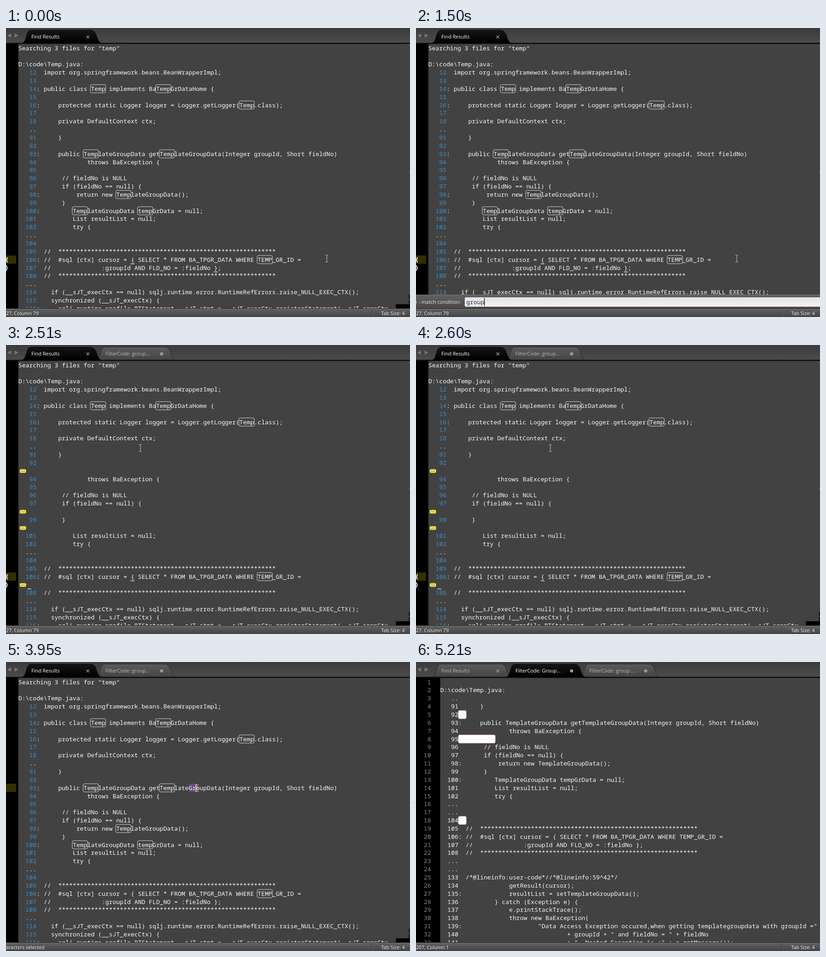
An HTML page with a canvas for the animation above (6140 ms loop, 884 by 634 pixels).

```html
<!DOCTYPE html>
<html>
<head>
<meta charset="utf-8">
<style>
  html, body { margin: 0; width: 100%; height: 100%; overflow: hidden; background: #000; }
  canvas { display: block; }
</style>
</head>
<body>
<canvas id="stage" width="884" height="634"></canvas>
<script>
const ctx = document.getElementById('stage').getContext('2d');
const LOOP = 6140, CHAR = 7.932, ROW = 17.85, TOP = 44, BLUE = '#3b8fcf';
const MONO = '13.22px "Noto Sans Mono", monospace';
const UI = '11px "Open Sans", sans-serif';

const stars = '*'.repeat(60);
const head = String.raw`Searching 3 files for "temp"

D:\code\Temp.java:
   12  import org.springframework.beans.BeanWrapperImpl;
   13
   14: public class Temp implements BaTempGrDataHome {
   15
   16:     protected static Logger logger = Logger.getLogger(Temp.class);
   17
   18      private DefaultContext ctx;`.split('\n');
const method = `   ..
   91      }
   92
   93:     public TemplateGroupData getTemplateGroupData(Integer groupId, Short fieldNo)
   94              throws BaException {
   95
   96       // fieldNo is NULL
   97       if (fieldNo == null) {
   98:          return new TemplateGroupData();
   99       }
  100:         TemplateGroupData tempGrData = null;
  101          List resultList = null;
  102          try {
  ...`.split('\n');
const query = `  104
  105  //  ${stars}
  106: //  #sql [ctx] cursor = { SELECT * FROM BA_TPGR_DATA WHERE TEMP_GR_ID =
  107  //              :groupId AND FLD_NO = :fieldNo };
  108  //  ${stars}
  ...`.split('\n');
const findTail = `  114    if (__sJT_execCtx == null) sqlj.runtime.error.RuntimeRefErrors.raise_NULL_EXEC_CTX();
  115    synchronized (__sJT_execCtx) {
  116:     sqlj.runtime.profile.RTStatement __sJT_stmt = __sJT_execCtx.registerStatement(__sJT_connCtx,`.split('\n');
const filterTail = `  ...
  133  /*@lineinfo:user-code*//*@lineinfo:59^42*/
  134              getResult(cursor);
  135:             resultList = setTemplateGroupData();
  136          } catch (Exception e) {
  137              e.printStackTrace();
  138              throw new BaException(
  139:                     "Data Access Exception occured,when getting templategroupdata with groupId ="
  140                              + groupId + " and fieldNo = " + fieldNo
  141                              + ", Nested Exception is :" + e.getMessage());`.split('\n');
const findLines = [...head, ...method, ...query, ...findTail];
const filterLines = ['', head[2], ...method, '  ...', ...query, ...filterTail];
const groupRows = [13, 18, 20, 27];

// Pointer positions, each held until the next time.
const pointer = [
  [0, 702, 506], [2120, 420, 200], [2200, -20, 0], [2510, 294, 226], [3160, 310, 240],
  [3240, 335, 255], [3320, 365, 268], [3400, 390, 276], [3480, 401, 277], [3870, 409, 277],
  [3950, 419, 277], [4030, 425, 277], [4110, 430, 277], [4190, 435, 277], [4420, 436, 278],
  [4580, 455, 290], [4660, 490, 315], [4740, 525, 340], [4820, 548, 357], [5130, 817, 626],
  [5210, -20, 0]
];
const typing = [410, 800, 1030, 1110, 1500];
const dragging = [3870, 3950, 4030, 4110, 4190];
const passed = (times, t) => times.filter(s => t >= s).length;
const rowY = row => TOP + row * ROW;

function rect(x, y, w, h, fill) {
  ctx.fillStyle = fill;
  ctx.fillRect(x, y, w, h);
}

function roundBox(x, y, w, h, fill, stroke) {
  ctx.beginPath();
  ctx.roundRect(x, y, w, h, 3);
  if (fill) { ctx.fillStyle = fill; ctx.fill(); }
  if (stroke) { ctx.strokeStyle = stroke; ctx.lineWidth = 1; ctx.stroke(); }
}

function shade(y0, y1, from, to) {
  const g = ctx.createLinearGradient(0, y0, 0, y1);
  g.addColorStop(0, from);
  g.addColorStop(1, to);
  return g;
}

function label(text, x, y, color, align = 'left', font = UI) {
  ctx.font = font;
  ctx.textAlign = align;
  ctx.fillStyle = color;
  ctx.fillText(text, x, y);
}

// Text on the fixed character grid.
function code(text, x, y, color = '#f8f8f8') {
  ctx.font = MONO;
  ctx.textAlign = 'left';
  ctx.fillStyle = color;
  [...text].forEach((ch, i) => ch !== ' ' && ctx.fillText(ch, x + i * CHAR, y + 4.6));
}

function dots(x, y, from, to, color) {
  for (let c = from; c < to; c++) rect(x + (c + .5) * CHAR - .5, y - .5, 1.2, 1.2, color);
}

function tab(index, title, active, mark, markColor = '#999') {
  const x = 35 + index * 162;
  ctx.beginPath();
  ctx.moveTo(x, 33);
  ctx.bezierCurveTo(x + 11, 31, x + 7, 4.5, x + 20, 4.5);
  ctx.lineTo(x + 150, 4.5);
  ctx.bezierCurveTo(x + 166, 4.5, x + 162, 31, x + 174, 33);
  ctx.fillStyle = active ? shade(4, 33, '#161616', '#000') : shade(4, 33, '#5c5c5c', '#444');
  ctx.fill();
  ctx.strokeStyle = active ? '#111' : '#262626';
  ctx.lineWidth = 1;
  ctx.stroke();
  label(title, x + 20.5, 23, active ? '#fff' : '#b8b8b8');
  ctx.strokeStyle = ctx.fillStyle = markColor;
  ctx.beginPath();
  if (mark === 'x') {
    ctx.lineWidth = 1.5;
    ctx.moveTo(x + 141, 16.5); ctx.lineTo(x + 147, 22.5);
    ctx.moveTo(x + 147, 16.5); ctx.lineTo(x + 141, 22.5);
    ctx.stroke();
  } else {
    ctx.arc(x + 143.5, 19.5, 3.6, 0, 7);
    ctx.fill();
  }
}

function tabBar(t) {
  rect(0, 0, 884, 33, shade(0, 33, '#3c3c3c', '#4b4b4b'));
  ctx.fillStyle = '#777';
  for (const [base, tip] of [[11, 3], [19, 27]]) {
    ctx.beginPath();
    ctx.moveTo(base, 12); ctx.lineTo(tip, 16.5); ctx.lineTo(base, 21);
    ctx.fill();
  }
  const tabs = [[0, 'Find Results', 'x']];
  if (t >= 4970) tabs.push([1, 'FilterCode: Group...'], [2, 'FilterCode: group...', '', '#a39282']);
  else if (t >= 1810) tabs.push([1, 'FilterCode: group...']);
  const active = showsFilter(t) ? 1 : 0;
  const draw = ([i, title, mark, color]) => tab(i, title, i === active, mark, color);
  tabs.filter(([i]) => i !== active).reverse().forEach(draw);
  rect(0, 32.5, 884, 2.5, '#0c0c0c');
  draw(tabs[active]);
}

function showsFilter(t) {
  return t >= 1810 && t < 2200 || t >= 4970;
}

function filterView() {
  const x = 53;
  rect(0, 34, x, 582, '#000');
  filterLines.forEach((line, row) => {
    const y = rowY(row);
    code(String(row + 1).padStart(2), 17, y, '#8a8a8a');
    code(line, x, y);
    const blanks = { 92: 2, 95: 10, 104: 2 }[line.trim()];
    if (blanks) {
      roundBox(x + 5 * CHAR, y - 9, blanks * CHAR + 1.5, 18, '#fff', '#e3b5b0');
      dots(x, y, 5, 5 + blanks, '#b9a9a9');
    }
  });
}

function selectedRow(x, row) {
  const y = rowY(row), line = findLines[row], end = line.length * CHAR;
  roundBox(x, y - 9, end, 17.8, '#684c75');
  for (let c = 0; c < line.length; c++) {
    const isTab = row === 18 && c > 6 && c < 16;
    if (line[c] === ' ' && !isTab) dots(x, y, c, c + 1, '#a08bab');
  }
  if (row === 18) {
    rect(x + 7 * CHAR, y, 6, 1, '#927c9d');
    rect(x + 8 * CHAR, y, 8 * CHAR - 1, 1, '#927c9d');
  }
  rect(x + end, y - 9, 1.3, 18, '#fff');
}

function findView(t) {
  const x = 27;
  const folded = t >= 2510 && t < 2850, selected = t >= 2850 && t < 3240, bracketed = t < 2850;
  rect(0, 34, x, 582, '#000');
  const marked = selected ? groupRows : [bracketed ? 26 : 13];
  marked.forEach(row => rect(0, rowY(row) - 9, 22, 18, '#333000'));
  if (bracketed) {
    const bold = 'bold 13px "Noto Sans Mono", monospace';
    label('{', -2, rowY(26) + 4, '#ffffe8', 'left', bold);
    label('}', -2, rowY(27) + 4, '#fff', 'left', bold);
    rect(x + 31 * CHAR, rowY(26) + 8.5, 8, 1.5, '#ddd');
    rect(folded ? 47 : x + 54 * CHAR, rowY(27) + 8.5, 8, 1.5, '#ddd');
  }
  if (t >= 3790) {
    const count = passed(dragging, t), start = x + 47 * CHAR;
    if (count) roundBox(start, rowY(13) - 9, count * CHAR, 18, '#684c75');
    rect(start + count * CHAR - .6, rowY(13) - 9, 1.3, 18, '#fff');
  }
  findLines.forEach((line, row) => {
    const y = rowY(row), isGroup = groupRows.includes(row);
    if (folded && isGroup) {
      roundBox(30, y - 3.5, 14, 8, '#f3e452');
      for (let i = 0; i < 3; i++) rect(33 + i * 3.2, y, 1.6, 1.6, '#6b6320');
      return;
    }
    if (selected && isGroup) selectedRow(x, row);
    const number = line.match(/^ *\d+/)?.[0] || '';
    code(number, x, y, BLUE);
    code(' '.repeat(number.length) + line.slice(number.length), x, y);
    if (row < 3 || selected && isGroup) return;
    for (const hit of line.matchAll(/temp/gi))
      roundBox(x + hit.index * CHAR - 1, y - 9, 33.5, 18, null, '#d8d8d8');
  });
  rect(853, 606, 31, 10, '#000');
  rect(881, 585, 3, 21, '#1c1c1c');
  for (const y of [38, 315, 595]) rect(881, y, 3, 1, '#777');
}

function inputPanel(t) {
  rect(0, 585, 884, 31, shade(585, 616, '#626262', '#474747'));
  rect(0, 585, 884, 1, '#777');
  label('e - match condition:', 98, 605, '#e4e4e4', 'right');
  roundBox(106, 590, 790, 22, shade(590, 612, '#e2e2e2', '#f4f4f4'), '#333');
  const count = passed(typing, t);
  code('group'.slice(0, count), 110, 601.5, '#1b2a40');
  rect(110 + count * CHAR - .5, 592, 1.2, 18, '#000');
}

function statusBar(t) {
  rect(0, 615, 884, 19, shade(616, 634, '#626262', '#434343'));
  rect(0, 615, 884, 1, '#222');
  rect(0, 616, 884, 1, '#777');
  rect(801, 617, 1, 17, '#383838');
  rect(802, 617, 1, 17, '#6a6a6a');
  const text = showsFilter(t) ? '207, Column 1'
    : t < 2850 ? '27, Column 79'
    : t < 3240 ? 'election regions'
    : t < 3870 ? '14, Column 48' : 'aracters selected';
  label(text, 0, 630, '#eee', 'left', '10.7px "Open Sans", sans-serif');
  label('Tab Size: 4', 821, 630, '#eee', 'left', '10.7px "Open Sans", sans-serif');
}

function beam(t) {
  const [, x, y] = pointer.findLast(p => t >= p[0]);
  const color = '#cfcfcf';
  rect(x - .5, y - 7, 1, 14, color);
  for (const end of [y - 8, y + 7]) {
    rect(x - 3, end, 2.5, 1, color);
    rect(x + .5, end, 2.5, 1, color);
  }
}

function render(now) {
  const t = now % LOOP;
  rect(0, 0, 884, 634, '#424242');
  if (showsFilter(t)) filterView(); else findView(t);
  tabBar(t);
  if (t >= 100 && t < 1810) inputPanel(t);
  statusBar(t);
  beam(t);
  requestAnimationFrame(render);
}
requestAnimationFrame(render);
</script>
</body>
</html>
```
